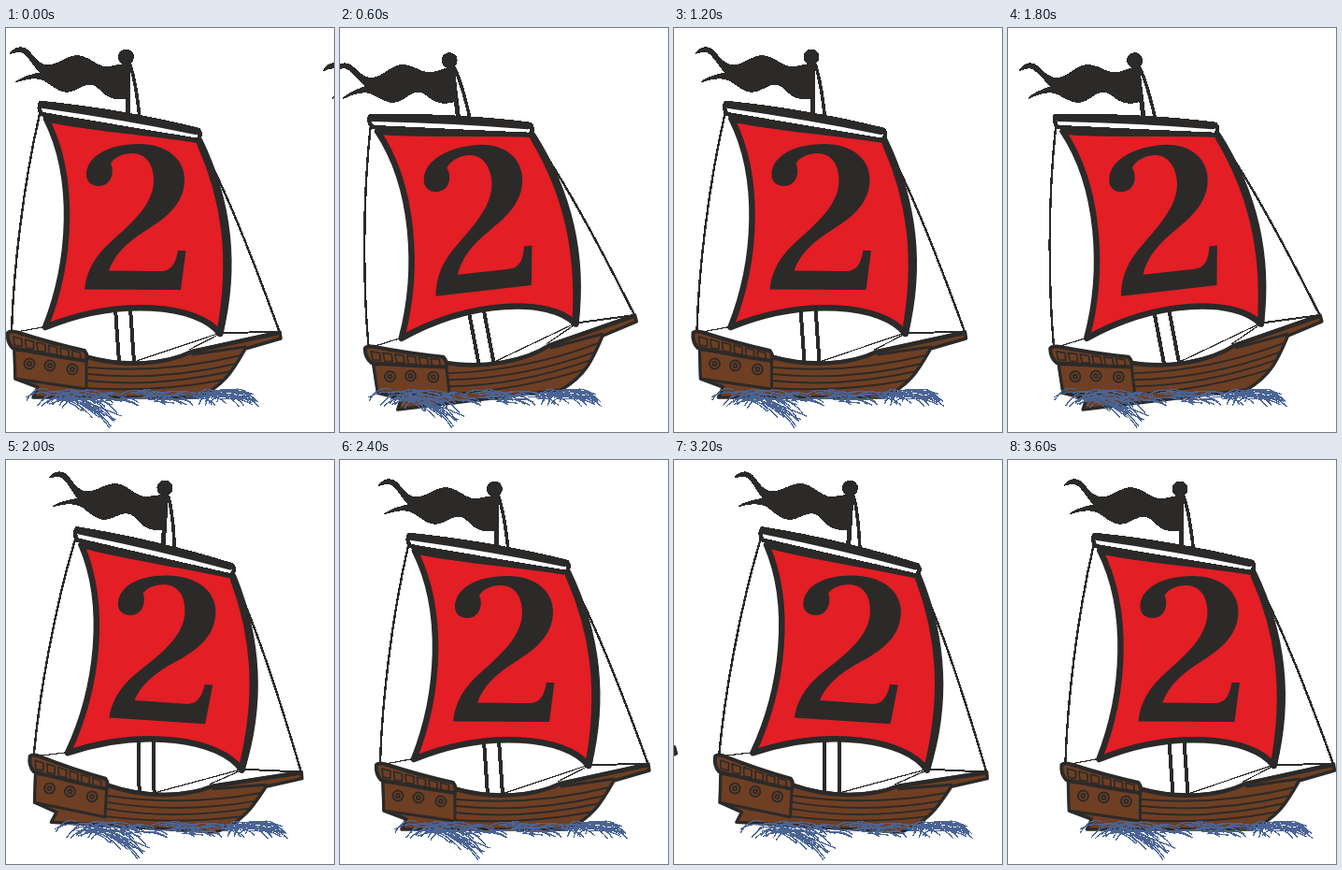
An HTML page for the animation above (3.8 s loop, 351 px wide and 432 px high).

```html
<!DOCTYPE html>
<html lang="en">
<head>
<meta charset="utf-8">
<title>Sailing ship</title>
<style>
  html, body { margin: 0; width: 100%; height: 100%; overflow: hidden; background: #fff; }
  svg { display: block; width: 100vw; height: 100vh; }
  .crisp { shape-rendering: crispEdges; }
</style>
</head>
<body>
<svg id="stage" viewBox="0 0 351 432">
  <defs>
    <g id="ship" fill="none" stroke="#2b2a29" stroke-linejoin="round" stroke-linecap="round">
      <g class="crisp">
        <!-- mast -->
        <path d="M117 300L121 357" stroke-width="4"/>
        <path d="M133 299L137 357" stroke-width="4"/>
        <path d="M130.500 40V94" stroke-width="5" stroke-linecap="butt"/>
        <path d="M133 40Q139 58 143 96" stroke-width="3.600"/>

        <!-- flag -->
        <path fill="#2b2a29" stroke-width="1.500" d="M5 27C11 19 20 19 26 27C33 36 39 41 47 40C58 39 66 29 77 30
          C90 31 95 41 107 42C116 42 122 38 131 39L132 74C124 77 114 76 107 71C100 66 97 59 88 60C79 61 75 68 64 68
          C53 67 47 58 39 55C31 52 21 54 11 57.500C19 52 27 50 37 48C30 41 25 30 18 26C13 24 9 26 5 27Z"/>
        <circle cx="128.500" cy="31" r="8.500" fill="#2b2a29" stroke="none"/>

        <!-- rigging -->
        <path d="M36 92C18 170 8 260 6 324" stroke-width="2.400"/>
        <path d="M207 122C234 168 264 246 293 326" stroke-width="2.400"/>
        <path d="M228 326L293 325" stroke-width="2"/>
        <path d="M6 326L44 319M137 357L229 326M196 344L229 327" stroke-width="1.200"/>
      </g>

      <!-- sail -->
      <path fill="#e31e25" stroke-width="6.500" d="M43 97C90 107 150 111 207 120C236 180 248 250 229 327
        C205 295 120 288 42 320C70 250 75 160 43 97Z"/>
      <path d="M208 124C234 182 244 245 229 326" stroke-width="7.500"/>
      <path d="M43 97Q80 105 125 108" stroke-width="6"/>

      <!-- numeral -->
      <path fill="#2b2a29" stroke="none" d="M86 157C86 138 108 124 142 124C172 124 191 140 191 162
        C191 190 168 205 149 217C130 229 116 242 110 259.500L165 260C175 260 181 255 184 238H192.500L187 280L84 279.500
        C86 260 95 243 115 226C135 208 158 188 158 163C158 145 149 134 135 134C125 134 116 138 112 145
        C116 152 114 169 99 169C91 169 86 164 86 157Z"/>

      <!-- yard -->
      <path class="crisp" fill="#fff" stroke-width="4.500" d="M37 80C90 85 155 96 206 109Q210 114 205 120C150 111 90 101 38 92Q34 85 37 80Z"/>
      <path d="M40 82C90 89 155 100 203 110" stroke-width="8"/>

      <!-- hull -->
      <path fill="#6f3f23" stroke-width="3.500" d="M9 344L86 351C125 362 170 360 198 346L293 325L294 332L256 343
        C244 364 234 383 205 395H29L34 384L10 375Z"/>
      <path d="M87 352C125 363 170 360 199 346L292 326" stroke-width="4.500"/>
      <path d="M200 349L256 341" stroke-width="3"/>
      <path d="M88 363Q170 370 251 350M87 370Q165 378 246 359M86 377Q160 385 241 367M86 385Q160 390 234 376"
        stroke-width="1.900"/>
      <path fill="#6f3f23" stroke-width="3" d="M9 344L86 353V386L10 375Z"/>
      <path fill="#6f3f23" stroke-width="4" d="M2 326Q5 323 14 326Q48 337 84 345Q88 350 86 356Q45 350 7 342Q1 336 2 326Z"/>
      <path id="panes" stroke-width="1.700"/>
      <g id="ports" stroke-width="1.900"></g>
    </g>
    <g id="water" class="crisp" fill="none" stroke="#4a6494" stroke-width="1.300" stroke-linecap="round"></g>
  </defs>
</svg>
<script>
const NS = 'http://www.w3.org/2000/svg';
const $ = id => document.getElementById(id);

const STEP = 200, STEPS = 19;
const DRIFT = 3.08, SPACING = 355;
const ROCK = [0, -6.85, -12.1, -6.85, 3.5, 9.4];
const PIVOT = '149 205';

function add(parent, tag, attrs) {
  const el = document.createElementNS(NS, tag);
  for (const k in attrs) el.setAttribute(k, attrs[k]);
  parent.appendChild(el);
  return el;
}

function rng(seed) {
  return () => (seed = (seed * 16807) % 2147483647) / 2147483647;
}

function buildHull() {
  let d = '';
  for (let i = 0; i < 6; i++) {
    const x = 8 + i * 12.5, y = 330 + i * 3;
    d += `M${x} ${y}l9 2.500v8l-8 -1.500z`;
  }
  $('panes').setAttribute('d', d);
  for (const [cx, cy] of [[25, 359], [47, 361], [71, 365]]) {
    add($('ports'), 'circle', { cx, cy, r: 5.5 });
    add($('ports'), 'circle', { cx, cy, r: 2 });
  }
}

function buildWater() {
  const rand = rng(71);
  const between = (a, b) => a + (b - a) * rand();
  // Each strand rises into a small crest, then trails off.
  const strands = (n, x0, x1, y0, y1, dx, dy, crest) => {
    let d = '';
    for (let i = 0; i < n; i++) {
      const x = between(x0, x1), y = between(y0, y1);
      const w = between(dx[0], dx[1]), h = between(dy[0], dy[1]);
      d += `M${x.toFixed(1)} ${y.toFixed(1)}q${(w * .55).toFixed(1)} ${(-crest * rand()).toFixed(1)} ${w.toFixed(1)} ${h.toFixed(1)}`;
    }
    add($('water'), 'path', { d });
  };
  strands(14, 42, 84, 387, 398, [26, 48], [6, 28], 12);
  strands(8, 66, 92, 394, 404, [24, 38], [12, 24], -10);
  strands(14, 44, 78, 386, 398, [-24, -10], [3, 12], 8);
  strands(24, 65, 190, 389, 400, [18, 40], [-3, 7], 10);
  strands(10, 110, 200, 393, 401, [14, 28], [0, 6], 5);
  strands(22, 195, 244, 388, 397, [18, 34], [0, 9], 9);
  strands(8, 230, 250, 388, 396, [18, 29], [5, 12], 7);
  strands(9, 215, 240, 387, 394, [-22, -8], [5, 13], 6);
}

// The middle ship, with its neighbours one rocking step apart on either side.
const fleet = [-1, 0, 1].map(place => {
  const group = add($('stage'), 'g', {});
  const ship = add(group, 'use', { href: '#ship' });
  add(group, 'use', { href: '#water' });
  return { place, group, ship };
});

function draw(step) {
  for (const { place, group, ship } of fleet) {
    const tilt = ROCK[(step + place + 6) % 6];
    group.setAttribute('transform', `translate(${place * SPACING + step * DRIFT} 0)`);
    ship.setAttribute('transform', `rotate(${tilt} ${PIVOT})`);
  }
}

const start = performance.now();
function tick() {
  draw(Math.floor((performance.now() - start) / STEP) % STEPS);
  requestAnimationFrame(tick);
}

buildHull();
buildWater();
draw(0);
requestAnimationFrame(tick);
</script>
</body>
</html>
```
